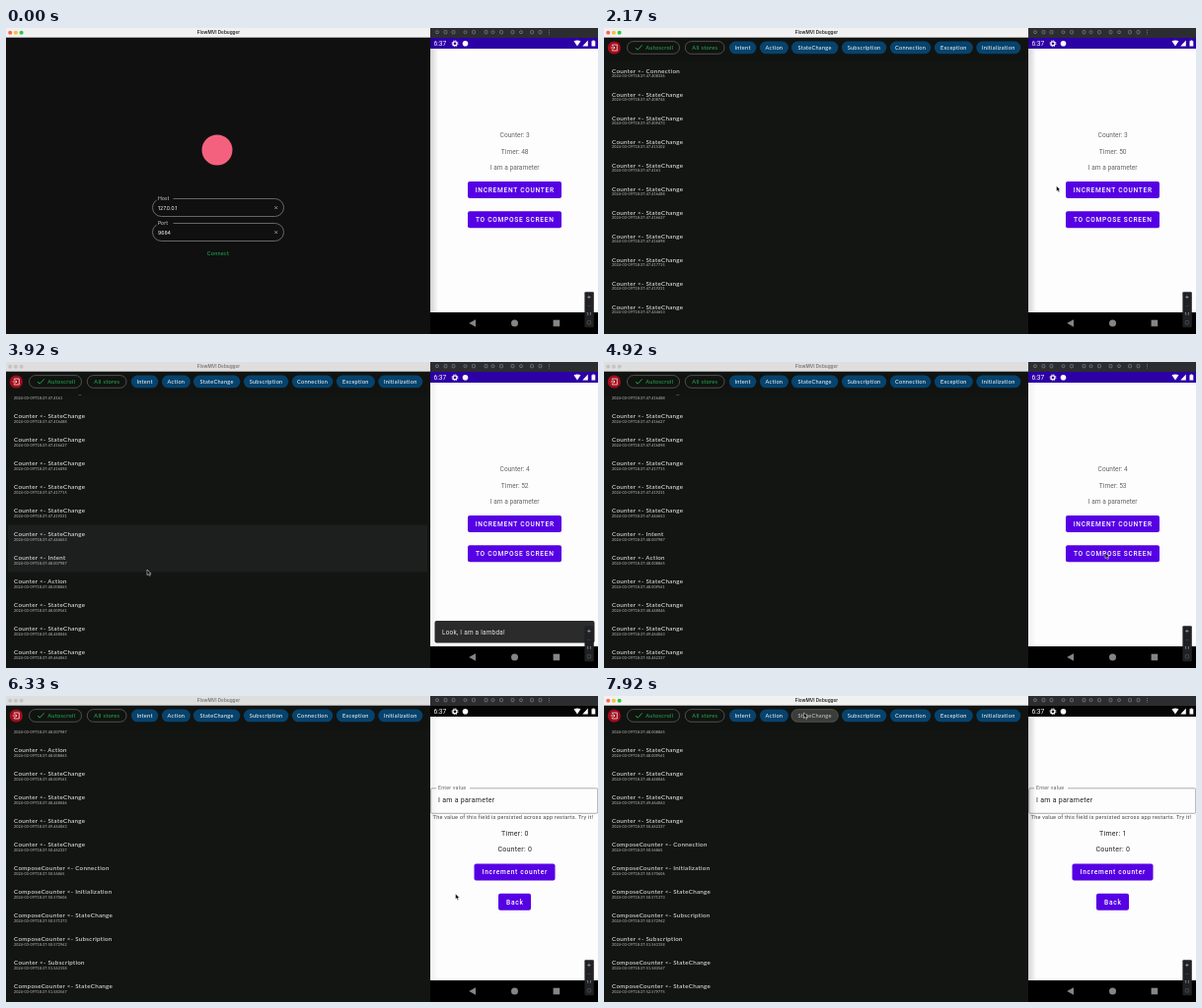
An HTML page for the animation above (8000 ms loop, 600 by 311 pixels).

```html
<!DOCTYPE html>
<html lang="en">
<head>
<meta charset="utf-8">
<title>FlowMVI Debugger</title>
<style>
  html, body { margin: 0; width: 100%; height: 100%; overflow: hidden; background: #000; }
  svg { display: block; width: 100%; height: 100%; }
  .round { font-family: Lato, sans-serif; letter-spacing: .05em; }
  .title { font-family: Inter, sans-serif; font-weight: 600; }
  .digits { font-family: Inter, sans-serif; letter-spacing: -.015em; }
  .phone { font-family: Roboto, sans-serif; }
  .body { font-family: Roboto, sans-serif; letter-spacing: .04em; }
  .button { font-family: Roboto, sans-serif; font-weight: 500; letter-spacing: .11em; }
</style>
</head>
<body>
<svg id="stage" viewBox="0 0 600 311"></svg>
<script>
const LOOP = 8;
const CLOCK_START = 45.65; // seconds past 18:37 on the log's clock when the loop begins
const CONNECT_AT = 0.5, LIST_AT = 1.76, CLICK_AT = 2.36, COMPOSE_AT = 4.95, FOCUS_AT = 7.55;
const COMPOSE_SLIDE = 0.4;
const ROW = 24, PURPLE = '#5600e4', GREEN = '#20b650', PAPER = '#fdfdfd';

const events = [
  ['Connection', '47.408336'], ['StateChange', '47.408744'], ['StateChange', '47.409473'],
  ['StateChange', '47.415302'], ['StateChange', '47.4161'], ['StateChange', '47.416488'],
  ['StateChange', '47.416627'], ['StateChange', '47.416898'], ['StateChange', '47.417715'],
  ['StateChange', '47.419231'], ['StateChange', '47.444653'], ['Intent', '48.007987'],
  ['Action', '48.008865'], ['StateChange', '48.009561'], ['StateChange', '48.448046'],
  ['StateChange', '49.464063'], ['StateChange', '50.462337'],
  ['Connection', '50.56865', 'Compose'], ['Initialization', '50.570606', 'Compose'],
  ['StateChange', '50.571373', 'Compose'], ['Subscription', '50.572962', 'Compose'],
  ['Subscription', '51.563158'], ['StateChange', '51.583567', 'Compose'],
  ['StateChange', '52.579775', 'Compose'],
].map(([kind, stamp, store = '']) => ({
  title: `${store}Counter &lt;- ${kind}`, stamp: `2024-03-09T18:37:${stamp}`, at: stamp - CLOCK_START,
}));

const filters = [ // label, left edge, width
  ['Intent', 81.6, 27.4], ['Action', 112.6, 29], ['StateChange', 144.6, 47.4], ['Subscription', 195.6, 45.4],
  ['Connection', 244.6, 41.4], ['Exception', 289.6, 39], ['Initialization', 332, 45],
];

const pointerPath = [ // seconds, x, y
  [0.3, 212.5, 225], [1.2, 212.5, 225], [2.17, 458.5, 160.5], [2.36, 500, 164], [2.75, 500, 164],
  [3.75, 143, 211], [4.05, 143, 211], [4.6, 510, 194], [4.88, 510, 194], [5.25, 451.5, 193],
  [6.33, 455.5, 201], [6.9, 455.5, 201], [7.5, 202.5, 17], [8, 202.5, 17],
];

const clamp = v => Math.min(1, Math.max(0, v));
const smooth = v => v * v * (3 - 2 * v);
const isFocused = t => t < CLICK_AT || t >= FOCUS_AT;

const rect = (x, y, w, h, fill, r = 0, extra = '') =>
  `<rect x="${x}" y="${y}" width="${w}" height="${h}" rx="${r}" fill="${fill}" ${extra}/>`;
const outline = (x, y, w, h, color, r) => rect(x, y, w, h, 'none', r, `stroke="${color}" stroke-width=".7"`);
const circle = (x, y, r, fill, extra = '') => `<circle cx="${x}" cy="${y}" r="${r}" fill="${fill}" ${extra}/>`;
const line = (d, color, width = .8, fill = 'none') =>
  `<path d="${d}" fill="${fill}" stroke="${color}" stroke-width="${width}"/>`;
// y is the vertical centre of the capitals
const text = (x, y, value, size, fill, font = 'round', anchor = 'start') =>
  `<text x="${x}" y="${y + size * .36}" font-size="${size}" fill="${fill}" class="${font}" text-anchor="${anchor}">${value}</text>`;
const centered = (x, y, value, size, fill, font) => text(x, y, value, size, fill, font, 'middle');

function pointerAt(t) {
  if (t < pointerPath[0][0]) return null;
  const i = pointerPath.findIndex(p => p[0] > t);
  const [t0, x0, y0] = pointerPath[i - 1], [t1, x1, y1] = pointerPath[i];
  const k = smooth((t - t0) / (t1 - t0));
  return { x: x0 + (x1 - x0) * k, y: y0 + (y1 - y0) * k };
}

function titleBar(t) {
  const focused = isFocused(t);
  const lights = focused ? ['#ff5f57', '#febc2e', '#28c840'] : ['#c4c4c4', '#c4c4c4', '#c4c4c4'];
  return rect(0, 0, 430, 9.7, focused ? '#f1f1f1' : '#dedede') +
    lights.map((c, i) => circle(4.2 + i * 5.7, 4.8, 2, c)).join('') +
    centered(215.5, 4.8, 'FlowMVI Debugger', 4.7, focused ? '#222' : '#777', 'title');
}

function inputField(y, label, value) {
  return outline(148.5, y, 133, 18, '#8a8d8a', 9) + rect(152.5, y - 2, 17, 4, '#101010') +
    text(154, y - .5, label, 5, '#d0d0d0') + text(154, y + 9.3, value, 5.3, '#f4f4f4', 'digits') +
    line(`M272.3 ${y + 7.7}l2.8 2.8m0 -2.8l-2.8 2.8`, '#ccc', .6);
}

function loginScreen() {
  return rect(0, 9.7, 430, 302, '#101010') + circle(214, 124, 15.5, '#f4617f') +
    inputField(173.5, 'Host', '127.0.0.1') + inputField(198.5, 'Port', '9684') +
    centered(215, 229.3, 'Connect', 5.5, GREEN);
}

function toolbar(t) {
  const listed = t >= LIST_AT, shift = listed ? 45.3 : 0;
  const chips = filters.map(([label, x, w]) => {
    const hovered = label === 'StateChange' && t >= 7.45;
    return rect(x + shift, 13.6, w, 12.7, hovered ? '#3b3d3b' : '#06436d', 6.3,
      hovered ? 'stroke="#686a68" stroke-width=".6"' : '') +
      centered(x + shift + w / 2, 19.8, label, 5.6, hovered ? '#d0d0d0' : '#fff');
  }).join('');
  return rect(0, 9.7, 430, 23.8, '#111311') +
    circle(10.3, 20, 6.6, '#a30d1d') +
    line('M8.3 18.4v-1.4h5v6h-5v-1.4M6.8 20h4.2m-1.5 -1.5l1.5 1.5l-1.5 1.5', '#fff', .7) +
    outline(23.5, 13.6, 53, 12.7, '#666966', 6.3) + line('M32 20l2.2 2.2l4.5 -4.8', GREEN, .9) +
    text(42.2, 19.8, 'Autoscroll', 5.7, GREEN) +
    (listed ? outline(82.3, 13.6, 39.7, 12.7, '#666966', 6.3) + centered(102.3, 19.8, 'All stores', 5.7, GREEN) : '') +
    chips;
}

function eventList(t, pointer) {
  const arrived = events.filter(e => e.at <= t);
  const length = arrived.reduce((sum, e) => sum + smooth(clamp((t - e.at) / .1)), 0);
  const scroll = Math.max(0, ROW * length - 275.5);
  let hover = '';
  if (pointer && pointer.x < 428 && pointer.y > 60) {
    const row = Math.floor((pointer.y - 35 + scroll) / ROW);
    if (row < arrived.length) hover = rect(2, (row - 1) * ROW + 34 - scroll, 425, ROW * 2, '#1d1f1e');
  }
  const rows = arrived.map((e, i) => {
    const y = 43.6 + i * ROW - scroll;
    return y < 20 ? '' : text(8, y, e.title, 6.2, '#f4f4f4') + text(8, y + 5.5, e.stamp, 3.6, '#c8c8c8');
  }).join('');
  return `<g clip-path="url(#list)">${hover}${rows}</g>`;
}

function debuggerScreen(t, pointer) {
  return rect(0, 9.7, 430, 302, '#131513') + toolbar(t) +
    (t < LIST_AT
      ? centered(215.3, 162.7, 'Waiting for events', 6.2, '#f4f4f4') + rect(214.8, 171, 2, .8, '#aaa')
      : eventList(t, pointer));
}

const button = (x, y, w, label, size = 6.6) =>
  rect(x, y, w, 17, PURPLE, 2) + centered(x + w / 2 + .3, y + 8.6, label, size, '#fff', 'button');

function counterScreen(t) {
  const timer = 48 + [.8, 1.79, 2.8, 3.81, 4.81].filter(at => t >= at).length;
  const labels = [`Counter: ${t < CLICK_AT ? 3 : 4}`, `Timer: ${timer}`, 'I am a parameter'];
  return rect(430, 21, 170, 268, PAPER) +
    labels.map((s, i) => centered(515.7, 108.8 + i * 16.5, s, 6.6, '#666', 'phone')).join('') +
    button(468, 156, 95, 'INCREMENT COUNTER') + button(468, 186.3, 95, 'TO COMPOSE SCREEN');
}

function snackbar(t) {
  const opacity = Math.min(clamp((t - 2.42) / .15), clamp((4.2 - t) / .08));
  return opacity ? `<g opacity="${opacity}">${rect(434.5, 263, 162, 22.5, '#2b2b2b', 2)}${
    text(442, 274.3, 'Look, I am a lambda!', 6.4, '#e4e4e4', 'body')}</g>` : '';
}

// The new window slides up over the status and navigation bars.
function composeScreen(t) {
  const p = clamp((t - COMPOSE_AT) / COMPOSE_SLIDE);
  const timer = t < 5.93 ? 52 : t < 6.93 ? 0 : 1;
  return `<g clip-path="url(#phone)"><g transform="translate(0 ${30 * (1 - p) ** 2})" opacity="${clamp(p * 4)}">` +
    rect(430, 16, 170, 273, PAPER) + rect(430, 18.5, 170, 2.5, '#050505') +
    outline(430.7, 93.8, 169, 25.5, '#8a8a8a', 1.5) + rect(436, 92, 34, 3, PAPER) +
    text(438, 93.4, 'Enter value', 5.3, '#666', 'body') +
    text(438, 105.5, 'I am a parameter', 7, '#222', 'body') +
    text(432.6, 123.3, 'The value of this field is persisted across app restarts. Try it!', 5.56, '#444', 'body') +
    centered(515.8, 139, `Timer: ${timer}`, 7, '#222', 'body') +
    centered(515.8, 155.5, 'Counter: 0', 7, '#222', 'body') +
    button(474.5, 170.5, 82, 'Increment counter') + button(499, 200.8, 33, 'Back') + '</g></g>';
}

function emulatorBar() {
  const icons = [437, 445.5, 453.5, 465.5, 474, 486.5, 493.5, 502, 513.5, 522, 533, 541.5];
  return rect(430, 0, 170, 10, '#2c2d30') +
    icons.map((x, i) => i % 3
      ? outline(x - 1.4, 2.6, 2.8, 3.2, '#85878a', .6)
      : circle(x, 4.2, 1.5, 'none', 'stroke="#85878a" stroke-width=".7"')).join('') +
    [2.5, 4.3, 6.1].map(y => circle(550.5, y, .45, '#b5b5b5')).join('');
}

function statusBar(color) {
  return rect(430, 10, 170, 11, color) +
    text(433.5, 16, '6:37', 6.6, '#fff', 'phone') +
    circle(455, 15.8, 2, 'none', 'stroke="#fff" stroke-width="1.3"') +
    circle(455, 15.8, 3, 'none', 'stroke="#fff" stroke-width=".8" stroke-dasharray="1.2 1.15"') +
    circle(465.5, 15.8, 2.8, '#fff') +
    '<path d="M575.5 13.3Q579 11.5 582.5 13.3L579 18.6ZM589.8 12.5v6h-5.5ZM593.5 13.2h1v-.8h1.8v.8h1v5.4h-3.8Z" fill="#fff"/>';
}

function navigationBar() {
  return rect(430, 289, 170, 22, '#000') +
    '<path d="M476 296.2v7.6l-6.8 -3.8Z" fill="#858585"/>' +
    circle(515.5, 300, 3.5, '#858585') + rect(554.6, 296.7, 6.6, 6.6, '#858585');
}

function phoneScreen(t) {
  const settled = t >= COMPOSE_AT + COMPOSE_SLIDE;
  return counterScreen(t) + snackbar(t) + (settled ? '' : statusBar('#2d00a6')) + navigationBar() +
    (t >= COMPOSE_AT ? composeScreen(t) : '') + (settled ? statusBar('#050505') : '') +
    rect(430, 10, 8, 279, 'url(#shade)', 0, `opacity="${isFocused(t) ? 1 : .35}"`);
}

function zoomPanel() {
  return rect(586.4, 268.3, 9.4, 36, '#202124', 1) +
    line('M589.2 273.5h3.4m-1.7 -1.7v3.4', '#bbb', .6) + line('M589.2 282.5h3.4', '#444', .6) +
    centered(591, 291, '1:1', 3.8, '#ddd', 'phone') + outline(589.3, 297.6, 3.4, 3.4, '#555', .3);
}

function arrow({ x, y }) {
  return `<path transform="translate(${x} ${y})" d="M0 0v5.6l1.3 -1.2l1 2l1 -.5l-.9 -1.9h1.7Z" fill="#000" stroke="#fff" stroke-width=".5"/>`;
}

const defs = `<defs>
  <clipPath id="list"><rect y="33.5" width="430" height="278"/></clipPath>
  <clipPath id="phone"><rect x="430" y="10" width="170" height="301"/></clipPath>
  <linearGradient id="shade"><stop stop-color="#000" stop-opacity=".17"/><stop offset="1" stop-color="#000" stop-opacity="0"/></linearGradient>
</defs>`;
const stage = document.getElementById('stage');

function draw(now) {
  const t = now / 1000 % LOOP;
  const pointer = pointerAt(t);
  stage.innerHTML = defs + rect(0, 0, 600, 311, '#000') +
    (t < CONNECT_AT ? loginScreen() : debuggerScreen(t, pointer)) + titleBar(t) +
    phoneScreen(t) + emulatorBar() + zoomPanel() +
    (pointer ? arrow(pointer) : '');
}

const start = performance.now();
function tick() {
  draw(performance.now() - start);
  requestAnimationFrame(tick);
}
tick();
</script>
</body>
</html>
```
